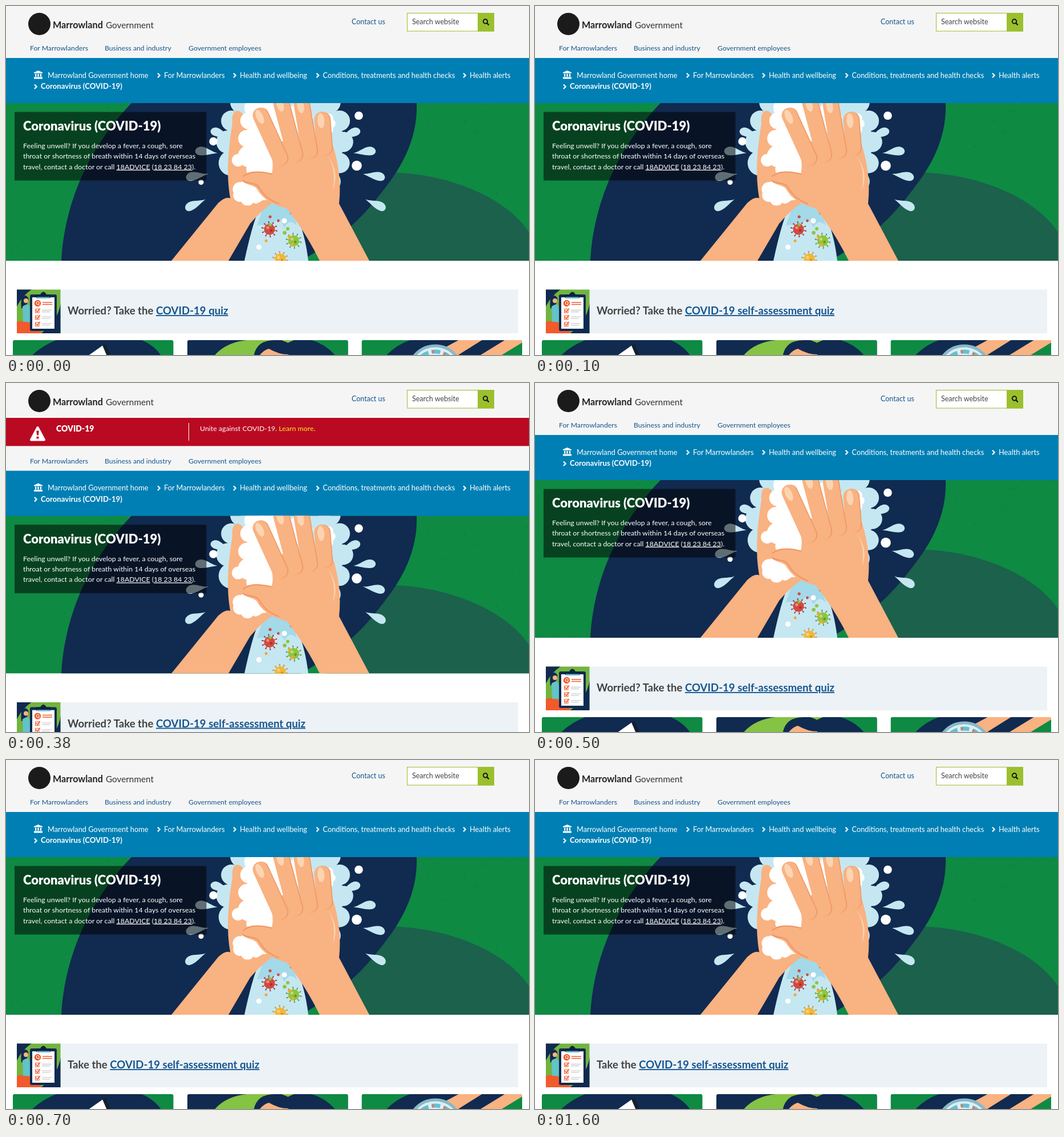
These frames come from a looping animation (917 by 611 pixels, 2.2 s). An HTML page:

```html
<!DOCTYPE html>
<html lang="en">
<head>
<meta charset="utf-8">
<title>Health notice page</title>
<style>
html, body { margin: 0; width: 100%; height: 100%; overflow: hidden; background: #fff; }
svg { display: block; position: absolute; left: 0; top: 0; }
text { font-family: Lato, "Open Sans", sans-serif; font-size: 12.36px; white-space: pre; }
.nav { fill: #15558f; font-size: 12.25px; }
.crumb { fill: #fff; font-size: 12.8px; }
.crumb.bold { font-size: 13.15px; }
.bold { font-weight: 700; }
.black { font-weight: 900; }
.link { text-decoration: underline; }
.quiz { font-size: 18.6px; font-weight: 700; fill: #414141; }
.quiz .link { fill: #15558f; text-decoration-thickness: 1.5px; text-underline-offset: 2px; }
.skin { fill: #f9b281; }
.fold { stroke: #ef9561; stroke-width: 2; stroke-linecap: round; fill: none; }
.navy { fill: #112a50; }
.green { fill: #0e8a43; }
.foam { fill: #c5e7f2; }
</style>
</head>
<body>
<svg width="917" height="611" viewBox="0 0 917 611">
  <defs>
    <clipPath id="hero"><rect y="170" width="917" height="276"/></clipPath>
    <clipPath id="thumb"><rect x="19" y="496.5" width="76.5" height="76.5"/></clipPath>
    <clipPath id="card"><rect width="281.5" height="200" rx="3"/></clipPath>
  </defs>

  <rect width="917" height="160" fill="#f5f5f5"/>

  <!-- header -->
  <circle cx="58.5" cy="31.5" r="19.5" fill="#1c1b1c"/>
  <text x="82" y="38.5" class="bold" fill="#222" style="font-size:16.2px">Marrowland</text>
  <text x="175" y="38.5" fill="#333" style="font-size:15.3px">Government</text>
  <text x="606" y="31.5" class="nav" style="font-size:12.5px">Contact us</text>
  <rect x="703.5" y="12.5" width="152" height="31.5" fill="#fff" stroke="#97bd2b"/>
  <rect x="827" y="12" width="29" height="32.5" fill="#9bc02d"/>
  <text x="712" y="32" fill="#444" style="font-size:12.5px">Search website</text>
  <circle cx="840.5" cy="27" r="3.7" fill="none" stroke="#111" stroke-width="1.9"/>
  <path d="M843.4 30L846 32.7" stroke="#111" stroke-width="2.3" stroke-linecap="round"/>

  <!-- alert bar -->
  <g id="alert">
    <rect y="61" width="917" height="49.3" fill="#b90a22"/>
    <path d="M55.5 78L67 99.5H44Z" fill="#fff" stroke="#fff" stroke-width="4" stroke-linejoin="round"/>
    <path d="M53.4 83.5h4.2l-.6 8h-3zM53.5 93.7h4v3.8h-4z" fill="#b90a22"/>
    <text x="88" y="84.5" class="black" fill="#fff" style="font-size:14px">COVID-19</text>
    <path d="M320.5 70V101" stroke="#fff"/>
    <text x="340" y="83.5" fill="#fff">Unite against COVID-19. <tspan fill="#ffec1f">Learn more</tspan>.</text>
  </g>

  <g id="page">
    <text x="42" y="78" class="nav">For Marrowlanders</text>
    <text x="173" y="78" class="nav">Business and industry</text>
    <text x="320" y="78" class="nav">Government employees</text>

    <rect y="91" width="917" height="80" fill="#007fb4"/>
    <path d="M56.5 113L64 116.3V117.8H49V116.3ZM51 118.8h2.4v5H51zM55.3 118.8h2.4v5h-2.4zM59.8 118.8h2.4v5h-2.4zM49 124.5h15v3H49z" fill="#fff"/>
    <g id="crumbs"></g>

    <!-- banner -->
    <g clip-path="url(#hero)">
      <rect y="170" width="917" height="276" class="green"/>
      <g id="dots"></g>
      <path d="M560 446C570 350 610 288 690 292C790 298 880 340 917 396V446Z" fill="#1b614c"/>
      <path d="M97 446C102 355 138 255 220 170H720C722 222 702 270 668 314C632 362 600 400 517 446Z" class="navy"/>
      <g id="foam" class="foam"></g>
      <path d="M397 205C394 178 412 178 420 197L446 300V350H396C384 300 390 250 397 205Z" class="skin"/>
      <g id="suds" fill="#fff"></g>

      <!-- water and back arm -->
      <path d="M448 345H500C516 375 526 410 530 446H418C426 410 434 375 448 345Z" class="foam"/>
      <path d="M455 342H498L510 385Q498 370 488 388Q478 362 465 386Q455 382 440 384Z" fill="#a3d9e8"/>
      <g id="germs"></g>
      <path d="M290 446L372 345Q390 328 400 342Q425 358 450 340H474Q450 355 428 381L390 446Z" class="skin"/>

      <!-- front hand -->
      <path d="M637 446L584 346Q590 290 570 235H500L456 240Q472 268 466 294C440 286 412 290 413 303C417 314 434 312 440 320C452 342 475 350 492 354Q525 395 550 446Z" class="skin"/>
      <g id="fingers"></g>
      <path d="M466 294C440 288 428 290 416 298M415 306C428 313 438 308 444 318C452 332 462 340 478 346" class="fold"/>
      <path d="M563 262Q580 285 573 322Q586 290 563 262Z" fill="#fcd4b2"/>
      <g id="bubbles" fill="#fff"></g>
      <rect x="15" y="185.5" width="336.5" height="120" fill-opacity=".52"/>
    </g>
    <g fill="#fff">
      <text x="30" y="218.3" class="black" style="font-size:22px">Coronavirus (COVID-19)</text>
      <text x="30" y="249">Feeling unwell? If you develop a fever, a cough, sore</text>
      <text x="30" y="267.4">throat or shortness of breath within 14 days of overseas</text>
      <text x="30" y="285.7">travel, contact a doctor or call <tspan class="link">18ADVICE</tspan> (<tspan class="link">18 23 84 23</tspan>).</text>
    </g>

    <!-- quiz row -->
    <rect x="19" y="496.5" width="879" height="76.5" fill="#ecf2f6"/>
    <g clip-path="url(#thumb)">
      <rect x="19" y="496" width="77" height="78" fill="#72b43f"/>
      <path d="M19 496H45Q28 508 19 526ZM96 520V574H60Q90 555 96 520Z" class="navy"/>
      <path d="M19 553Q40 546 64 574H19Z" fill="#f15a2b"/>
      <path d="M27 530Q24 506 35 507Q44 512 35 524Z" class="navy"/>
      <circle cx="35" cy="516" r="4" class="skin"/>
      <path d="M29 526Q40 518 42 529V553H30Z" fill="#62c3c9"/>
      <rect x="42" y="505" width="47" height="64" rx="3" class="navy"/>
      <rect x="46" y="510" width="39" height="55" fill="#fff"/>
      <path d="M53 511V505H60Q65.500 496 71 505H78V511Z" fill="#0b2242"/>
      <rect x="54" y="509.5" width="23" height="2.5" fill="#66bfd0"/>
      <circle cx="55.5" cy="520.5" r="5.7" fill="#f15a2b"/>
      <text x="52.6" y="523.4" class="bold" fill="#fff" style="font-size:8px">Q</text>
      <path d="M64 519H81M64 522.5H81" stroke="#f15a2b" stroke-width="1.5"/>
      <g id="checks" fill="none"></g>
    </g>
    <text class="quiz" x="108" y="540"><tspan id="lead"></tspan><tspan id="quiz" class="link"></tspan></text>

    <!-- cards -->
    <g transform="translate(12 585)" clip-path="url(#card)">
      <rect width="282" height="80" class="green"/>
      <path d="M30 30Q50 10 76 0H226Q250 10 262 30Z" class="navy"/>
      <path d="M128 30L158 9L170 30Z" fill="#fff"/>
      <path d="M157 9L163 7L173 30H166Z" fill="#15202e"/>
    </g>
    <g transform="translate(318 585)" clip-path="url(#card)">
      <rect width="282" height="80" class="navy"/>
      <path d="M218 0H282V30H262Q245 8 218 0Z" class="green"/>
      <path d="M45 30Q65 4 104 0H187Q160 10 154 30Z" fill="#84c344"/>
      <path d="M116 30Q120 0 153 0H165Q190 8 196 30Z" class="navy"/>
      <path d="M124 30Q132 18 143 15Q160 25 177 25L180 30Z" class="skin"/>
    </g>
    <g transform="translate(623.5 585)" clip-path="url(#card)">
      <rect width="282" height="80" class="green"/>
      <path d="M40 30Q60 8 85 0H250Q240 18 225 30Z" class="navy"/>
      <path d="M142 15L170 0H211L163 30ZM202 30L251 0H282V4L239 30Z" class="skin"/>
      <g fill="none">
        <circle cx="129" cy="57" r="47" fill="#dceef3" stroke="#87b9c8" stroke-width="5"/>
        <circle cx="129" cy="57" r="37" stroke="#63c0d4" stroke-width="7" stroke-dasharray="15 6"/>
        <circle cx="129" cy="57" r="37" stroke="#ee704c" stroke-width="4" stroke-dasharray="4 17"/>
      </g>
    </g>
  </g>
</svg>
<script>
const $ = id => document.getElementById(id);
const put = (id, parts) => { $(id).innerHTML = parts.join(""); };
const times = (n, f) => Array.from({ length: n }, (_, i) => f(i));
const circle = (x, y, r, extra = "") => `<circle cx="${x}" cy="${y}" r="${r}" ${extra}/>`;

let seed = 7;
const rand = () => (seed = seed * 16807 % 2147483647) / 2147483647;

// Ellipse with a scalloped rim of n bubbles
const cloud = (x, y, rx, ry, n, r) =>
  `<ellipse cx="${x}" cy="${y}" rx="${rx}" ry="${ry}"/>` +
  times(n, i => {
    const a = i * 2 * Math.PI / n;
    return circle(x + rx * Math.cos(a), y + ry * Math.sin(a), r * (.85 + rand() * .3));
  }).join("");

// Teardrop on a ray from the hands, its round head at distance r
const drop = (angle, r, side) =>
  `<path transform="translate(490 270) scale(${side} 1) rotate(${angle}) translate(${r} 0)"
    d="M-38 0C-25 -2 -18 -9 -8 -8C4 -6 4 7 -8 7C-18 7 -28 2 -38 0Z"/>`;

function germ(x, y, color, dark) {
  const rays = times(10, i => `<g transform="translate(${x} ${y}) rotate(${i * 36 + 12})">
    <path d="M0 0H13" stroke="${dark}" stroke-width="1.2"/>${circle(13, 0, 1.2, `fill="${dark}"`)}</g>`);
  return rays.join("") + circle(x, y, 9.5, `fill="${color}"`) +
    circle(x - 3, y - 3, 2.6, `fill="#fff" fill-opacity=".4"`) +
    circle(x + 3, y + 2, 2.2, `fill="${dark}"`);
}

// Fingers fan out from the knuckles; each overlaps the one to its right
function finger(i) {
  const x = 446 + 36 * i, y = 168 + 12 * (i - 1.4) ** 2;
  const bx = 480 + 26 * i, by = 266 - 6 * i;
  const line = (color, dx) => `<path d="M${x + dx} ${y}L${bx + dx} ${by}" fill="none"
    stroke="${color}" stroke-width="27" stroke-linecap="round"/>`;
  const turn = Math.atan2(by - y, bx - x) * 180 / Math.PI;
  return line("#ef9561", 1.6) + line("#f9b281", 0) +
    `<ellipse transform="translate(${x} ${y}) rotate(${turn})" cx="2" cy="2" rx="13" ry="6" fill="#fcd4b2"/>`;
}

const crumbs = [[73, "Marrowland Government home"], [277, "For Marrowlanders"],
  [410, "Health and wellbeing"], [555.5, "Conditions, treatments and health checks"],
  [813, "Health alerts"], [61, "Coronavirus (COVID-19)"]];
put("crumbs", crumbs.map(([x, label], i) => {
  const last = i === crumbs.length - 1, y = last ? 145.2 : 125.5;
  const arrow = i ? `<path d="M${x - 11} ${y - 7.8}l3.7 3.8l-3.7 3.8" fill="none" stroke="#fff" stroke-width="2.2"/>` : "";
  return arrow + `<text x="${x}" y="${y}" class="crumb ${last ? "bold" : ""}">${label}</text>`;
}));

put("dots", times(260, () =>
  circle(rand() * 917, 170 + rand() * 276, .6, `fill="${rand() < .15 ? "#4fa048" : "#0a6b38"}"`)));
put("foam", [cloud(490, 238, 101, 108, 18, 20)].concat(
  [1, -1].flatMap(side => times(4, i => drop(-22 + 16 * i, 140 + 18 * i, side)))));
put("suds", [cloud(450, 232, 28, 62, 12, 17), cloud(428, 326, 20, 12, 7, 13),
  cloud(564, 206, 6, 10, 5, 9), cloud(490, 195, 40, 20, 6, 8)]);
put("germs", [germ(462, 391, "#d4483e", "#a92f2f"), germ(504.5, 411, "#91c43d", "#5d9a2f"),
  germ(481, 443, "#f3b635", "#d68f1f")].concat(times(9, i =>
  circle(456 + rand() * 48, 362 + 7 * i, 2 + rand() * 1.6,
    `fill="${["#d4483e", "#91c43d", "#eeaa31"][i / 3 | 0]}"`))));
put("fingers", times(4, i => finger(3 - i)));
put("bubbles", [[618.5, 192, 7.3], [615, 279.5, 8.8], [363.5, 237, 7.2], [342, 308.5, 4.6],
  [407, 270, 11], [488, 376, 4.6], [443.5, 422, 4.6]].map(b => circle(...b)));
put("checks", times(3, i => `<g transform="translate(51.5 ${530.5 + 11.7 * i})">
  <rect width="6.5" height="6.5" stroke="#f15a2b"/>
  <path d="M1 2l2.300 3l5 -6" stroke="#f15a2b" stroke-width="1.5"/>
  <path d="M11.5 2h17M11.5 5h14" stroke="#c9cdd1" stroke-width="1.3"/></g>`));

const LOOP = 2200, SHIFT = 62.6;

function draw() {
  const t = performance.now() % LOOP;
  const open = t >= 200 && t < 500;
  $("alert").style.display = open ? "" : "none";
  $("page").setAttribute("transform", `translate(0 ${open ? SHIFT : 0})`);
  $("lead").textContent = t < 700 ? "Worried? Take the " : "Take the ";
  $("quiz").textContent = t < 100 ? "COVID-19 quiz" : "COVID-19 self-assessment quiz";
  requestAnimationFrame(draw);
}
draw();
</script>
</body>
</html>
```
